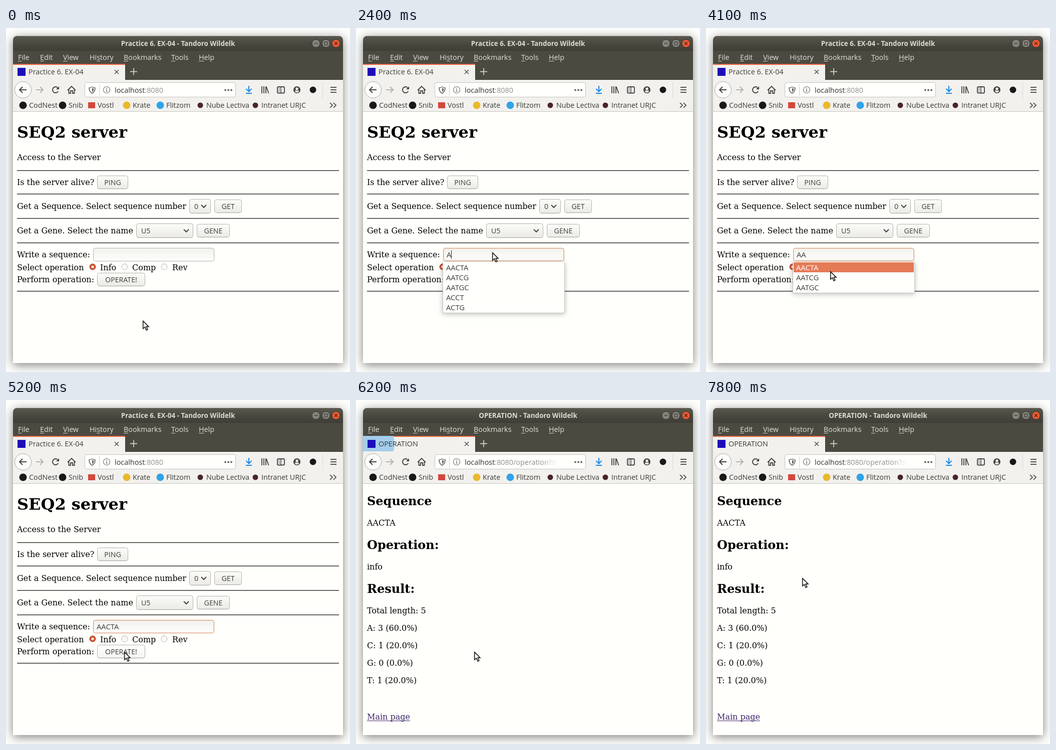
Recreate the animation shown at these times as an HTML page with a canvas. Size 687x690 px, loop 8 s.

```html
<!DOCTYPE html>
<html lang="en">
<head>
<meta charset="utf-8">
<title>SEQ2 server</title>
<style>
html, body { margin: 0; width: 100%; height: 100%; overflow: hidden; background: #fefefd; }
canvas { display: block; width: 687px; height: 690px; }
</style>
</head>
<body>
<canvas id="stage"></canvas>
<script>
const W = 687, H = 690, LOOP = 8000;
const UI = '"Open Sans", "Noto Sans", sans-serif';
const PAGE = '"DejaVu Serif", serif';
const BROWSER = 'Tandoro Wildelk';
const INK = '#3d3d3a';
const canvas = document.getElementById('stage');
const c = canvas.getContext('2d');
const dpr = window.devicePixelRatio || 1;
canvas.width = W * dpr;
canvas.height = H * dpr;

function text(s, x, y, font, color = '#000', align = 'left') {
  c.font = font;
  c.fillStyle = color;
  c.textAlign = align;
  c.fillText(s, x, y);
  return c.measureText(s).width;
}
const ui = (s, x, y, color = INK, size = 14.4, align) => text(s, x, y, `${size}px ${UI}`, color, align);
const serif = (s, x, y, size = 16, weight = '') => text(s, x, y, `${weight} ${size}px ${PAGE}`);

function rect(x, y, w, h, color) {
  c.fillStyle = color;
  c.fillRect(x, y, w, h);
}

function round(x, y, w, h, r, fill, stroke, width = 1) {
  c.beginPath();
  c.roundRect(x, y, w, h, r);
  paint(fill, stroke, width);
}

function circle(x, y, r, fill, stroke, width = 1) {
  c.beginPath();
  c.arc(x, y, r, 0, Math.PI * 2);
  paint(fill, stroke, width);
}

function paint(fill, stroke, width) {
  if (fill) { c.fillStyle = fill; c.fill(); }
  if (stroke) { c.strokeStyle = stroke; c.lineWidth = width; c.stroke(); }
}

function path(points, color, width = 1.6, fill, close) {
  c.beginPath();
  for (let i = 0; i < points.length; i += 2) c.lineTo(points[i], points[i + 1]);
  if (close) c.closePath();
  paint(fill, color, width);
}

function shade(y0, y1, ...colors) {
  const g = c.createLinearGradient(0, y0, 0, y1);
  colors.forEach((k, i) => g.addColorStop(i / (colors.length - 1), k));
  return g;
}

// ---- browser window ----

function drawFrame(title) {
  rect(0, 0, W, H, '#fefefd');
  c.save();
  c.shadowColor = 'rgba(0,0,0,.5)';
  c.shadowBlur = 20 * dpr;
  c.shadowOffsetY = 4 * dpr;
  round(14, 16, 659, 656, [8, 8, 0, 0], '#fffffb');
  c.restore();
  round(14, 16, 659, 31, [8, 8, 0, 0], shade(16, 46, '#59594e', '#4a4940', '#3e3d37'));
  rect(14, 46, 659, 58, '#4b4a41');
  rect(20, 16, 647, 1, '#6b6a60');
  text(`${title} - ${BROWSER}`, 343.5, 36, `bold 13.4px ${UI}`, '#dfdbd2', 'center');

  for (const [i, x] of [619, 639, 659].entries()) {
    circle(x, 31, 8, i < 2 ? '#84837b' : '#ec5b32', '#33322d');
    if (i === 0) path([x - 3.5, 31, x + 3.5, 31], '#3b3a34', 1.2);
    if (i === 1) c.strokeRect(x - 3, 28, 6, 6);
    if (i === 2) {
      path([x - 3, 28, x + 3, 34], '#4b2014', 1.3);
      path([x + 3, 28, x - 3, 34], '#4b2014', 1.3);
    }
  }

  const menu = [['File', 24], ['Edit', 68], ['View', 114], ['History', 167, 2],
    ['Bookmarks', 235], ['Tools', 330], ['Help', 385]];
  for (const [name, x, k = 0] of menu) {
    ui(name, x, 64, '#e4e0d8', 14.3);
    const from = c.measureText(name.slice(0, k)).width;
    rect(x + from, 66, c.measureText(name[k]).width, 1, '#d4d0c8');
  }
}

function drawTab(title, burst) {
  rect(14, 72, 224, 32, '#f2f1ed');
  rect(14, 72, 224, 2, '#ee6a45');
  if (burst.alpha > 0) {
    c.save();
    c.beginPath();
    c.rect(14, 72, 224, 31);
    c.clip();
    c.globalAlpha = burst.alpha;
    circle(31, 88, burst.r, '#a5cdec');
    c.restore();
  }
  rect(238, 74, 1, 29, '#36352f');
  rect(238, 103, 435, 1, '#3c3b35');
  rect(23, 80, 16, 16, '#1d0cb8');
  ui(title, 45, 93, INK);
  path([217, 84, 225, 92], '#55544f', 1.6);
  path([225, 84, 217, 92], '#55544f', 1.6);
  path([248, 87.5, 262, 87.5], '#d9d6ce', 1.7);
  path([255, 80.5, 255, 94.5], '#d9d6ce', 1.7);
}

function drawToolbar(path2) {
  const k = '#42423f';
  rect(14, 104, 659, 63, '#f2f1ed');
  rect(14, 167, 659, 1, '#c5c4c0');
  circle(34, 124, 16.5, '#fcfcfa', '#aaa9a5');
  const arrow = (x, dir, color) => {
    path([x - 7 * dir, 124, x + 7 * dir, 124], color, 2);
    path([x + dir, 118, x + 7 * dir, 124, x + dir, 130], color, 2);
  };
  arrow(34, -1, k);
  arrow(67, 1, '#b4b3b0');
  c.beginPath();
  c.arc(99, 124, 6, .5, 5.4);
  paint(null, k, 2);
  path([106, 117, 106, 123, 100, 123], null, 1, k, true);
  path([123, 125, 131, 117, 139, 125], k, 1.8);
  path([125.5, 123, 125.5, 131, 129, 131, 129, 126, 133, 126, 133, 131, 136.5, 131, 136.5, 123], k, 1.8);

  round(157.5, 109.5, 301, 29, 3, '#fffffc', '#c3c2bf');
  c.beginPath();
  c.moveTo(172, 118);
  c.quadraticCurveTo(175, 120, 178, 120);
  c.quadraticCurveTo(178, 128, 172, 131);
  c.quadraticCurveTo(166, 128, 166, 120);
  c.quadraticCurveTo(169, 120, 172, 118);
  paint(null, '#5d5d5a', 1.5);
  path([172, 120.5, 175.5, 122, 174.5, 126, 172, 128.5], null, 1, '#5d5d5a', true);
  rect(186, 113, 1, 23, '#cfcecb');
  circle(201, 124, 6.5, null, '#777774', 1.2);
  rect(200.2, 123, 1.6, 5, '#777774');
  rect(200.2, 120, 1.6, 1.8, '#777774');
  const w = ui('localhost', 217, 130, '#31312f');
  const fade = c.createLinearGradient(370, 0, 402, 0);
  fade.addColorStop(0, '#8e8e8b');
  fade.addColorStop(1, 'rgba(142,142,139,0)');
  ui(':8080' + path2, 217 + w, 130, fade);
  for (const x of [438, 444, 450]) circle(x, 124.5, 2, '#686865');

  const blue = '#1685e8';
  path([485, 116, 485, 127], blue, 2);
  path([479.5, 122, 485, 127.5, 490.5, 122], blue, 2);
  path([479, 131, 491, 131], blue, 2);
  for (const x of [511, 515, 519]) path([x, 117, x, 131], k, 1.8);
  path([520, 118, 524.5, 131], k, 1.8);
  round(542, 118, 14, 12.5, 2, null, k, 1.8);
  path([549, 118, 549, 130], k, 1.4);
  for (const y of [121, 124, 127]) path([544, y, 547, y], k, 1);
  circle(581, 124, 7, k);
  circle(581, 122, 2.7, '#f2f1ed');
  c.beginPath();
  c.arc(581, 125.5, 4, 0, Math.PI);
  paint('#f2f1ed');
  circle(613, 124, 6.5, '#181816');
  rect(632, 108, 1, 33, '#dad9d5');
  for (const y of [119, 124, 129]) path([648, y, 660, y], k, 1.8);

  const marks = [['CodNest', 46, '#191919', 34], ['Snib', 125, '#191919', 113],
    ['Vostl', 183, '#d3483c', 171, true], ['Krate', 253, '#e9b82c', 241],
    ['Flitzom', 320, '#30a3e8', 308], ['Nube Lectiva', 400, '#4a2426', 388],
    ['Intranet URJC', 510, '#4a2426', 498]];
  for (const [name, x, color, ix, square] of marks) {
    if (square) rect(ix - 7, 149, 14, 12, color);
    else circle(ix, 155, x > 390 ? 5.5 : 7.5, color);
    ui(name, x, 160, '#3a3a37', 14.3);
  }
  for (const x of [647, 654]) path([x, 150, x + 5, 155, x, 160], k, 1.7);
}

// ---- form page ----

function button(label, x, y, w, state) {
  const fill = state === 'down' ? shade(y, y + 27, '#dddcd6', '#e6e5e0')
    : state === 'hover' ? shade(y, y + 27, '#ffffff', '#f5f4f0')
    : shade(y, y + 27, '#fcfcf9', '#ebeae5');
  round(x + .5, y + .5, w - 1, 26, 4, fill, '#b3b1ab');
  rect(x + 4, y + 26, w - 8, 1, '#a19f99');
  ui(label, x + w / 2, y + 19, INK, 14.2, 'center');
}

function select(value, x, y, w) {
  round(x + .5, y + .5, w - 1, 28, 4, shade(y, y + 29, '#fcfcf9', '#ebeae5'), '#b3b1ab');
  rect(x + 4, y + 28, w - 8, 1, '#a19f99');
  ui(value, x + 10, y + 20, INK, 14.2);
  const r = x + w - 19;
  path([r, y + 12, r + 5, y + 17, r + 10, y + 12], '#44443f', 2);
}

function radio(x, on) {
  circle(x, 479, 6, on ? '#cf5230' : shade(473, 485, '#f4f3ef', '#fffffd'), on ? '#b5472a' : '#b9b8b2');
  if (on) circle(x, 479, 2.6, '#fff6f1');
}

function drawForm(s) {
  serif('SEQ2 server', 22, 220, 32, 'bold');
  serif('Access to the Server', 22, 265);
  for (const y of [285, 332, 381, 430, 527]) {
    rect(22, y, 643, 1, '#5c5c5a');
    rect(22, y + 1, 643, 1, '#71716e');
  }
  serif('Is the server alive?', 22, 315);
  button('PING', 182, 296, 62);
  serif('Get a Sequence. Select sequence number', 22, 363);
  select('0', 366, 343, 43);
  button('GET', 416, 344, 55);
  serif('Get a Gene. Select the name', 22, 412);
  select('U5', 260, 392, 114);
  button('GENE', 381, 393, 66);

  serif('Write a sequence:', 22, 460);
  round(174.5, 441.5, 241, 26, 4, shade(441, 468, '#f0f0ec', '#f8f8f5', '#fefefb'),
    s.focus ? '#d79a78' : '#b3b1ab');
  if (s.focus) round(175.5, 442.5, 239, 24, 3, null, 'rgba(232,150,110,.3)');
  const w = ui(s.value, 181, 460, INK, 14.8);
  if (s.caret) rect(181 + Math.round(w), 446, 1, 17, '#222');

  serif('Select operation', 22, 486);
  for (const [i, name] of ['Info', 'Comp', 'Rev'].entries()) {
    radio([173, 237, 316][i], i === 0);
    serif(name, [188, 252, 332][i], 486);
  }
  serif('Perform operation:', 22, 510);
  button('OPERATE!', 182, 491, 96, s.button);
  if (s.popup) drawPopup(s);
}

function drawPopup(s) {
  const rows = ['AACTA', 'AATCG', 'AATGC', 'ACCT', 'ACTG'].slice(0, s.rows);
  const h = rows.length * 20 + 3;
  c.save();
  c.globalAlpha = s.popup;
  c.shadowColor = 'rgba(0,0,0,.25)';
  c.shadowBlur = 10 * dpr;
  c.shadowOffsetY = 2 * dpr;
  rect(173, 469, 244, h, '#c4c3bf');
  c.shadowColor = 'transparent';
  rect(174, 469, 242, h - 1, '#fffffc');
  if (s.picked) rect(175, 470, 240, 20, '#e57a57');
  rows.forEach((row, i) => ui(row, 180, 486 + i * 20, s.picked && !i ? '#fff' : INK, 14.8));
  c.restore();
}

// ---- result page ----

function drawResult() {
  serif('Sequence', 22, 211, 24, 'bold');
  serif('AACTA', 22, 252);
  serif('Operation:', 22, 299, 24, 'bold');
  serif('info', 22, 340);
  serif('Result:', 22, 387, 24, 'bold');
  const seq = 'AACTA';
  serif(`Total length: ${seq.length}`, 22, 428);
  for (const [i, base] of [...'ACGT'].entries()) {
    const n = seq.split(base).length - 1;
    serif(`${base}: ${n} (${(n / seq.length * 100).toFixed(1)}%)`, 22, 463 + i * 35);
  }
  const w = text('Main page', 22, 641, `16px ${PAGE}`, '#40256e');
  rect(22, 643, w, 1, '#40256e');
}

// ---- pointer ----

const KEYS = [[0, 273, 587], [800, 273, 587], [1400, 275, 454], [2200, 275, 454], [2300, 272, 450],
  [3600, 272, 450], [3900, 248, 488], [4400, 248, 488], [4900, 254, 493], [5100, 254, 493],
  [5200, 236, 505], [7400, 236, 505], [7800, 192, 357], [LOOP, 192, 357]];

function pointerAt(t) {
  const i = KEYS.findIndex((k, n) => n && t <= k[0]);
  const [t0, x0, y0] = KEYS[i - 1], [t1, x1, y1] = KEYS[i];
  const p = (t - t0) / (t1 - t0), e = p * p * (3 - 2 * p);
  return [x0 + (x1 - x0) * e, y0 + (y1 - y0) * e];
}

function drawPointer(t) {
  const [x, y] = pointerAt(t);
  c.save();
  c.translate(Math.round(x), Math.round(y));
  if (t < 2300 && y < 468) {
    const beam = [[-3, -7.5, 3, -7.5], [0, -7.5, 0, 7.5], [-3, 7.5, 3, 7.5]];
    beam.forEach(b => path(b, '#fff', 3.6));
    beam.forEach(b => path(b, '#111', 1.7));
  } else {
    c.shadowColor = 'rgba(0,0,0,.25)';
    c.shadowBlur = 2 * dpr;
    path([.7, .7, .7, 16, 4.5, 12.8, 7.2, 19, 9.8, 17.8, 7.2, 12, 12, 12], '#141414', 1.4, '#fff', true);
  }
  c.restore();
}

function stateAt(t) {
  return {
    value: t < 2300 ? '' : t < 2800 ? 'A' : t < 4200 ? 'AA' : 'AACTA',
    focus: t >= 1400,
    caret: t >= 1400 && t < 4100 || t >= 4200 && t < 4600,
    popup: t < 2300 || t >= 4200 ? 0 : t < 2400 ? .5 : 1,
    rows: t < 3100 ? 5 : 3,
    picked: t >= 3800,
    button: t >= 6000 ? 'down' : t >= 4700 ? 'hover' : ''
  };
}

function draw(now) {
  const t = Math.floor(now % LOOP / 100) * 100;
  const done = t >= 6100;
  const title = done ? 'OPERATION' : 'Practice 6. EX-04';
  const age = (t - 6100) / 100;
  const burst = { r: Math.max(0, 46 * age ** 1.4), alpha: done ? Math.min(1, (4 - age) / 3) : 0 };
  c.setTransform(dpr, 0, 0, dpr, 0, 0);
  drawFrame(title);
  drawTab(title, burst);
  drawToolbar(done ? '/operation?seq=AACTA' : '');
  if (done) drawResult();
  else drawForm(stateAt(t));
  drawPointer(t);
}

const start = performance.now();
function tick() {
  draw(performance.now() - start);
  requestAnimationFrame(tick);
}
tick();
</script>
</body>
</html>
```
